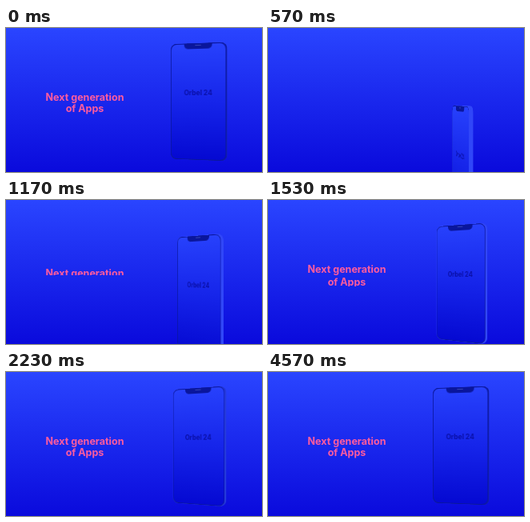
Write an HTML page that moves like this. It is 320x180 px and loops after 4630 ms.

```html
<!DOCTYPE html>
<html lang="en">
<head>
<meta charset="utf-8">
<title>Next generation of Apps</title>
<style>
html, body { margin: 0; width: 100%; height: 100%; overflow: hidden; }
#stage {
  position: relative; width: 320px; height: 180px; overflow: hidden;
  background: linear-gradient(#2a45ff, #0a0adc);
  font-family: Inter, "Open Sans", sans-serif; font-weight: 700;
  perspective: 500px; perspective-origin: 239.5px 90px;
}
.line {
  position: absolute; left: 38px; width: 121px; height: 14px; overflow: hidden;
  font-size: 12.5px; line-height: 14px; text-align: center; white-space: nowrap; color: #ff5c9e;
}
.line span { display: block; }
#phone, #phone div { position: absolute; box-sizing: border-box; }
#phone { left: 203.5px; top: 18.9px; width: 72px; height: 145.6px; transform-style: preserve-3d; }
#phone .slab, #phone .face { inset: 0; border-radius: 8px; }
#phone .slab, #phone .wall { background: var(--side); }
#phone .wall { left: 69.4px; top: 8px; width: 5.2px; height: 129.6px; transform: translateZ(-2.6px) rotateY(90deg); }
#phone .face { border: 1.5px solid #0a169c; background: linear-gradient(#2741fc, #1625ea 50%, #0509d2); }
#phone .notch { left: 16.5px; top: -.5px; width: 36px; height: 6px; border-radius: 0 0 5px 5px; background: #0a169c; }
#phone .speaker { left: 14px; top: 1.6px; width: 8px; height: 1px; border-radius: 1px; background: #3545b4; }
#phone .label {
  left: 0; right: 0; top: 55px; line-height: 12px; font-size: 8.7px;
  text-align: center; white-space: nowrap; color: #0a10a8;
}
</style>
</head>
<body>
<div id="stage">
  <div class="line" style="top:80px"><span>Next generation</span></div>
  <div class="line" style="top:94px"><span>of Apps</span></div>
  <div id="phone">
    <div class="wall"></div>
    <div class="face">
      <div class="notch"><div class="speaker"></div></div>
      <div class="label">Orbel 24</div>
    </div>
  </div>
</div>
<script>
const LOOP = 4630, START = 30;
const phone = document.getElementById('phone');
const lines = document.querySelectorAll('.line span');

// Stacked slabs give the body its rounded thickness
for (let z = 0.4; z < 5.3; z += 0.6) {
  const slab = document.createElement('div');
  slab.className = 'slab';
  slab.style.transform = `translateZ(${-z}px)`;
  phone.prepend(slab);
}

const clamp = v => Math.min(1, Math.max(0, v));
const expoOut = u => u >= 1 ? 1 : 1 - 2 ** (-10 * u);
const mix = (a, b, k) => `rgb(${a.map((v, i) => v + (b[i] - v) * k)})`;

// Fast turn that settles into a slow drift
const angle = t => 15 + 0.0047 * (4570 - t) + Math.max(0, 0.0021 * (2190 - t)) ** 3;
const drop = t => Math.max(0, 82.5 * Math.exp(-0.00171 * (t - 570)) - 4);

function draw(now) {
  let t = now % LOOP;
  if (t < START) t = LOOP;
  const a = angle(t);
  phone.style.transform = `translateY(${drop(t)}px) rotateY(${-a}deg)`;
  phone.style.setProperty('--side', mix([14, 28, 168], [48, 70, 248], clamp((a - 16) / 16)));
  lines.forEach((line, i) => {
    const shift = 15 * (1 - expoOut(clamp((t - 1000 - 200 * i) / 1000)));
    line.style.transform = `translateY(${shift}px)`;
  });
}

function loop() {
  draw(performance.now());
  requestAnimationFrame(loop);
}
loop();
</script>
</body>
</html>
```
